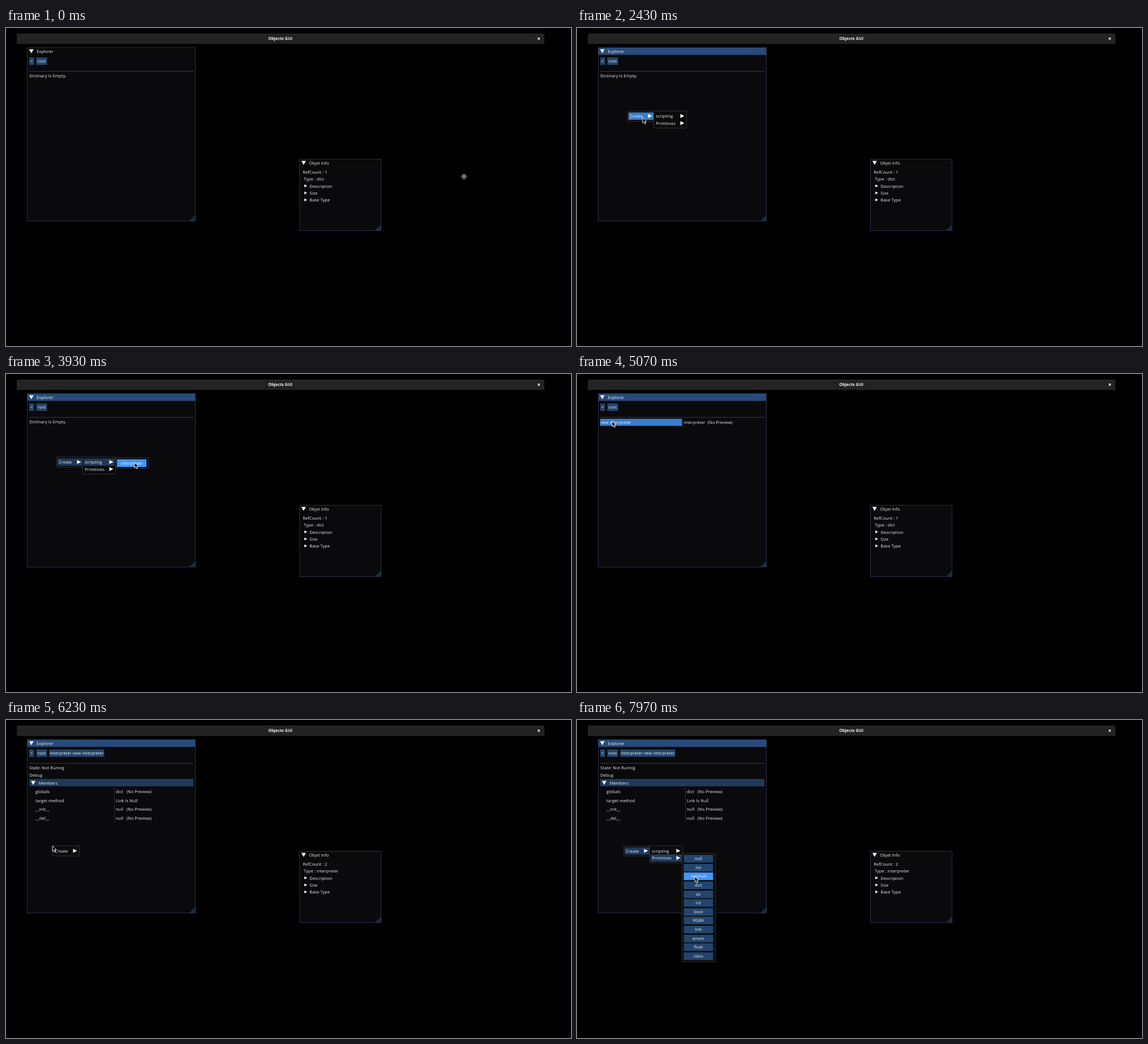
Animation of 998 by 561 pixels, one loop 8 s. Source, as an HTML page:

```html
<!DOCTYPE html>
<html lang="en">
<head>
<meta charset="utf-8">
<title>Objects GUI</title>
<style>
html, body { margin: 0; width: 100%; height: 100%; overflow: hidden; background: #000; }
svg { display: block; width: 100vw; height: 100vh; }
text { font: 7.3px "Open Sans", "Noto Sans", sans-serif; letter-spacing: .13px; fill: #f4f4f4; text-rendering: geometricPrecision; white-space: pre; }
.bold { font-weight: 700; letter-spacing: 0; }
.mid { text-anchor: middle; }
</style>
</head>
<body>
<svg id="stage" viewBox="0 0 998 561"></svg>
<script>
const LOOP = 8000;
const stage = document.getElementById('stage');
const C = {
  panel: '#0a0a0d', popup: '#0b0b0b', edge: '#2b2b4c', popupEdge: '#303036', rule: '#3a392a',
  title: '#294a7a', button: '#23456d', header: '#1e3a5b', hover: '#3b7cca', active: '#4296fa', grip: '#1a2c3a'
};

// Pointer stops: time, x, y
const stops = [
  [0, 809, 262], [30, 809, 262], [830, 163, 190], [870, 163, 190], [1130, 160, 185],
  [1670, 60, 58], [1770, 60, 58], [2150, 90, 147], [2300, 95, 150], [2430, 116, 158],
  [2570, 120, 157], [2630, 120, 157], [2930, 145, 157], [3070, 145, 157], [3870, 227, 156],
  [3990, 227, 156], [4530, 66, 88], [4670, 66, 88], [5070, 62, 83], [5200, 62, 83],
  [5470, 74, 112], [5990, 74, 112], [6070, 82, 222], [6400, 82, 222], [6700, 100, 230],
  [7030, 145, 243], [7070, 145, 243], [7350, 190, 245], [7870, 209, 278], [7930, 209, 278], [7970, 208, 276]
];

function pointerAt(t) {
  const i = stops.findIndex(s => s[0] > t);
  if (i < 0) return stops[stops.length - 1].slice(1);
  const [t0, x0, y0] = stops[i - 1], [t1, x1, y1] = stops[i];
  const u = (t - t0) / (t1 - t0), k = u * u * (3 - 2 * u);
  return [x0 + (x1 - x0) * k, y0 + (y1 - y0) * k];
}

const rect = (x, y, w, h, fill, stroke = 'none') =>
  `<rect x="${x}" y="${y}" width="${w}" height="${h}" fill="${fill}" stroke="${stroke}"/>`;
const path = (d, fill, extra = '') => `<path d="${d}" fill="${fill}" ${extra}/>`;
const text = (x, cy, s, cls = '') => `<text x="${x}" y="${cy + 2.6}" class="${cls}">${s}</text>`;
const down = (x, y) => path(`M${x} ${y}h8l-4 7z`, '#fff');
const right = (x, cy, w = 7, h = 7) => path(`M${x} ${cy - h / 2}l${w} ${h / 2}l${-w} ${h / 2}z`, '#fff');
const line = (x1, y1, x2, y2, color) => path(`M${x1} ${y1}L${x2} ${y2}`, 'none', `stroke="${color}"`);
const button = (x, y, w, h, label, fill) =>
  rect(x, y, w, h, fill) + text(x + w / 2, y + h / 2, label, 'mid');

function panel(x, y, w, h, label, titleFill) {
  const r = x + w, b = y + h;
  return rect(x + .5, y + .5, w - 1, h - 1, C.panel) +
    path(`M${r} ${b - 12}V${b}H${r - 12}z`, C.grip) +
    rect(x + .5, y + .5, w - 1, h - 1, 'none', C.edge) +
    rect(x + 1, y + 1, w - 2, 12.5, titleFill) +
    down(x + 3.7, y + 3.5) + text(x + 17.3, y + 7, label);
}

const popup = (x, y, w, h) => rect(x + .5, y + .5, w - 1, h - 1, C.popup, C.popupEdge);

function item(x, y, w, label, fill) {
  return (fill ? rect(x + 2, y + 3, w - 4, 13, fill) : '') +
    text(x + 4.3, y + 9.6, label) + right(x + w - 11.5, y + 9.3);
}

// Context menu with optional submenu; open is 0 none, 1 scripting, 2 primitives
function contextMenu(x, y, sub, open, inside) {
  const sx = x + 46;
  const fillFor = (ix, iy, w, isOpen) =>
    inside(ix + 2, iy + 3, w - 4, 13) ? C.hover : isOpen ? C.header : '';
  let s = popup(x, y, 48, 19) + item(x, y, 48, 'Create', fillFor(x, y, 48, sub));
  if (sub) {
    s += popup(sx, y, 59, 31);
    s += item(sx, y, 59, 'scripting', fillFor(sx, y, 59, open === 1));
    s += item(sx, y + 12.5, 59, 'Primitives', open === 2 ? C.header : fillFor(sx, y + 12.5, 59, false));
  }
  return s;
}

function titleBar() {
  return path('M19 28V13q0-3 3-3H948q3 0 3 3V28z', '#232323') +
    line(21, 10.5, 949, 10.5, '#303030') +
    text(484.5, 18.6, 'Objects GUI', 'bold mid') +
    path('M939.2 16.8l3.8 3.8m0-3.8l-3.8 3.8', 'none', 'stroke="#fff" stroke-width="1.2"');
}

function explorer(t, inside) {
  const opened = t >= 5180, menu = t >= 2150 && t < 4000 || t >= 6230;
  const rootFill = !menu && inside(53, 52, 19, 13) ? C.active : C.button;
  let s = panel(37, 34, 298, 307, 'Explorer', t >= 880 ? C.title : '#0a0a0a') +
    button(41, 52, 8.5, 13, '&lt;', C.button) + button(53.5, 52, 19, 13, 'root', rootFill) +
    line(41, 76.5, 331, 76.5, C.rule);
  if (t < 4000) return s + text(41.3, 84.8, 'Dictinary Is Empty.');
  if (!opened) {
    if (inside(41, 79, 145, 13)) s += rect(41, 79, 144.5, 12.5, C.hover);
    return s + line(186, 79, 186, 94, C.popupEdge) + text(41, 85.8, 'new interpreter') +
      text(188.3, 85.8, 'interpreter') + text(230.8, 85.8, '(No Preview)');
  }
  const hot = t < 5730 && inside(41, 104, 290, 13);
  s += button(76.5, 52, 97, 13, 'interpreter new interpreter', C.button) +
    text(41.3, 84.8, 'State: Not Runnig') + text(41.3, 97.3, 'Debug') +
    rect(41, 104, 290, 13, hot ? C.hover : C.header) + text(57.7, 111, 'Members');
  if (t < 5600) return s + right(45, 111);
  s += down(44, 107.5) + line(191.5, 119, 191.5, 181, C.popupEdge);
  [['globals', 'dict'], ['target method', 'Link Is Null'], ['__init__', 'null'], ['__del__', 'null']]
    .forEach(([name, value], i) => {
      const y = 126.5 + 15.55 * i;
      s += text(52, y, name) + text(194, y, value) + (i === 1 ? '' : text(213, y, '(No Preview)'));
    });
  return s;
}

function info(t) {
  const opened = t >= 5180;
  let s = panel(518, 231, 145, 127, 'Objet Info', '#0a0a0a') +
    text(524.3, 254, 'RefCount : ' + (opened ? 2 : 1)) +
    text(526, 266.6, 'Type : ' + (opened ? 'interpreter' : 'dict'));
  ['Description', 'Size', 'Base Type'].forEach((label, i) => {
    const y = 279 + 12.4 * i;
    s += right(527, y - .5, 5, 5) + text(536.3, y, label);
  });
  return s;
}

function menus(t, inside) {
  let s = '';
  if (t >= 2150 && t < 4000) {
    s += contextMenu(89, 146, t >= 2330, t >= 2800 ? 1 : 0, inside);
    if (t >= 2800) {
      s += popup(194, 147, 58, 20) +
        button(196, 150.5, 52, 13.5, 'interpreter', inside(196, 150, 52, 14) ? C.active : C.button);
    }
  }
  if (t >= 6230) {
    const list = t >= 7080;
    s += contextMenu(82, 221.5, t >= 6700, list ? 2 : 0, inside);
    if (list) {
      s += popup(185, 235, 60, 192);
      'null list method dict str int bool RGBA link enum float class'.split(' ').forEach((label, i) => {
        const y = Math.round(238.2 + 15.6 * i);
        s += button(188.5, y, 52, 13.4, label, inside(188, y, 53, 13.4) ? C.active : C.button);
      });
    }
  }
  return s;
}

function pointer(t, x, y) {
  if (t < 100) {
    let s = '';
    for (let a = 0; a < 360; a += 90) {
      s += `<path d="M0 -5.2l2.2 2.4H.8V-.8H-.8V-2.8H-2.2z" transform="rotate(${a})"/>`;
    }
    return `<g transform="translate(${x} ${y})" fill="#111" stroke="#ccc" stroke-width=".7">${s}</g>`;
  }
  return path('M0 0V9.6L2.2 7.6L3.8 11.2L5.5 10.4L4 7H6.9z', '#080808',
    `stroke="#fff" stroke-width=".9" stroke-linejoin="round" transform="translate(${x} ${y})"`);
}

function draw(t) {
  const [px, py] = pointerAt(t);
  const inside = (x, y, w, h) => px >= x && px < x + w && py >= y && py < y + h;
  stage.innerHTML = rect(0, 0, 998, 561, '#000') + titleBar() + explorer(t, inside) +
    info(t) + menus(t, inside) + pointer(t, px, py);
}

const start = performance.now();
function tick() {
  draw((performance.now() - start) % LOOP);
  requestAnimationFrame(tick);
}
draw(0);
requestAnimationFrame(tick);
</script>
</body>
</html>
```
